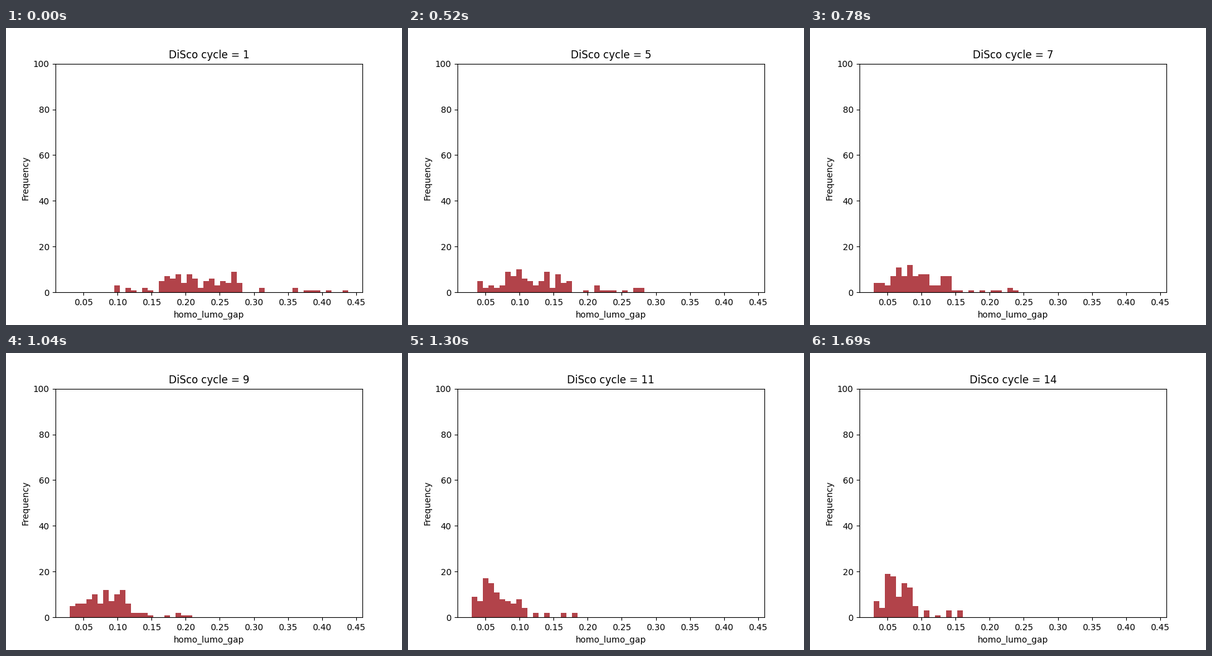
Animation of 640x480 px, one loop 1820 ms. Source, as a matplotlib script:

```python
import numpy as np
import matplotlib.pyplot as plt
from matplotlib.animation import FuncAnimation

BINS = 50
CYCLES = 14
SAMPLES = 100
X_MIN, X_MAX = 0.00923, 0.45913

# Quantiles of the gap in bin units, at the first cycle and once settled.
LEVELS = np.array([0, 0.1, 0.25, 0.5, 0.75, 0.9, 1])
START = np.array([8, 16.2, 18.7, 22.2, 27.3, 31, 49.9])
SETTLED = np.array([0, 1.6, 2.4, 2.8, 4.2, 5, 11])
DECAY = 2.2 + 3.8 * LEVELS  # low gaps settle faster than high ones


def counts_at(cycle):
    """Draw the seeded sample of one cycle and count it per bin."""
    rng = np.random.default_rng(cycle)
    fade = np.exp(-(cycle - 1) / DECAY)
    quantiles = SETTLED + (START - SETTLED) * fade
    u = np.append(rng.random(SAMPLES - 2), [0, 1])
    values = np.interp(u, LEVELS, quantiles)
    return np.bincount(values.astype(int), minlength=BINS)


fig, ax = plt.subplots(figsize=(6.4, 4.8), dpi=100)
span = (X_MAX - X_MIN) / 1.1
edges = X_MIN + 0.05 * span + np.linspace(0, span, BINS + 1)
bars = ax.bar(edges[:-1], np.zeros(BINS), width=np.diff(edges),
              align="edge", color="#b2434a")
ax.set_xlim(X_MIN, X_MAX)
ax.set_ylim(0, 100)
ax.set_xticks(np.arange(1, 10) * 0.05)
ax.set_xlabel("homo_lumo_gap")
ax.set_ylabel("Frequency")
title = ax.set_title("DiSco cycle = 1")


def update(frame):
    cycle = frame + 1
    for bar, n in zip(bars, counts_at(cycle)):
        bar.set_height(n)
    title.set_text(f"DiSco cycle = {cycle}")
    return [*bars, title]


anim = FuncAnimation(fig, update, frames=CYCLES, interval=130, repeat=True,
                     repeat_delay=0, blit=False)
plt.show()
```
